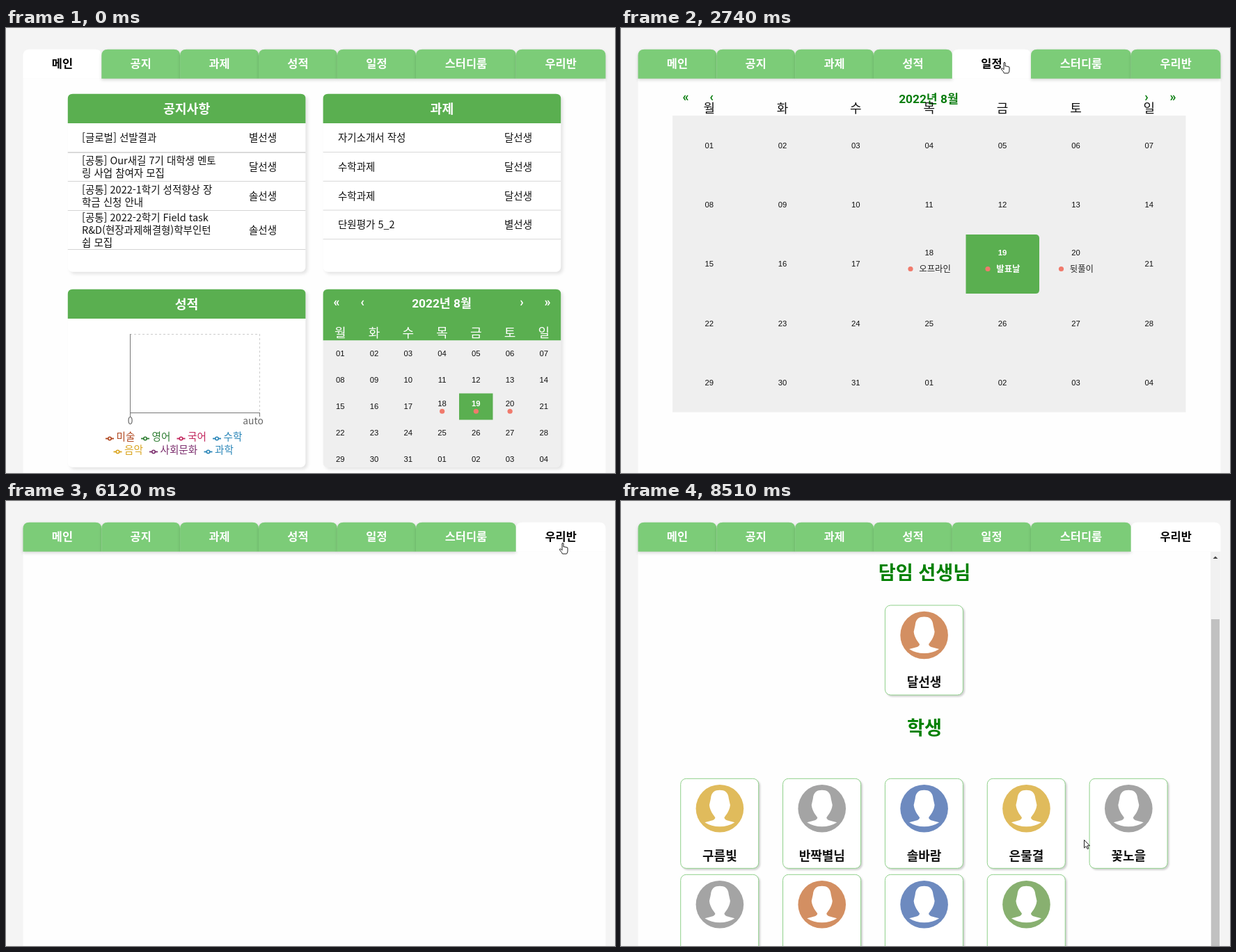
Recreate the animation shown at these times as an HTML page. Size 875 by 640 pixels, loop 8590 ms.

```html
<!DOCTYPE html>
<html lang="ko">
<head>
<meta charset="utf-8">
<style>
html, body { margin: 0; width: 100%; height: 100%; overflow: hidden; background: #f4f4f4; }
svg { display: block; }
text { font-family: "Noto Sans CJK KR", "Noto Sans CJK", "Open Sans", sans-serif; white-space: pre; }
.date { font-family: "Liberation Sans", sans-serif; }
.nav { font-family: Roboto, "Noto Sans CJK KR", "Noto Sans CJK", sans-serif; }
.tab { filter: drop-shadow(0 2px 2px rgba(0,0,0,.16)); }
.card { filter: drop-shadow(3px 3px 2px rgba(0,0,0,.1)); }
.person { filter: drop-shadow(2px 2px 1px rgba(0,0,0,.18)); }
</style>
</head>
<body>
<svg id="stage" width="875" height="640" viewBox="0 0 875 640"></svg>
<script>
const LOOP = 8590, GREEN = '#5aaf50', TAB = '#7ccc78', DEEP = '#008000', CORAL = '#f07a6c';
const LEFT = 88.8, RIGHT = 455.6, CARD_W = 341.6;
const $ = id => document.getElementById(id);

// Text is placed by its vertical centre.
function text(x, y, str, size, { fill = '#111', bold = 0, anchor = 'start', cls = '', id = '' } = {}) {
  return `<text id="${id}" class="${cls}" x="${x}" y="${y + size * .36}" font-size="${size}" fill="${fill}"
    font-weight="${bold ? 700 : 400}" text-anchor="${anchor}">${str.replace('&', '&amp;')}</text>`;
}
const mid = (x, y, str, size, opts) => text(x, y, str, size, { anchor: 'middle', ...opts });
const rect = (x, y, w, h, fill, extra = '') =>
  `<rect x="${x}" y="${y}" width="${w}" height="${h}" fill="${fill}" ${extra}/>`;
const line = (x1, y1, x2, y2, color = '#ddd', extra = '') =>
  `<path d="M${x1} ${y1}L${x2} ${y2}" stroke="${color}" ${extra}/>`;
const dot = (x, y) => `<circle cx="${x}" cy="${y}" r="3.6" fill="${CORAL}"/>`;
const roundTop = (x, y, w, h, r, extra) =>
  `<path d="M${x} ${y + h}v${r - h}q0 ${-r} ${r} ${-r}h${w - 2 * r}q${r} 0 ${r} ${r}v${h - r}z" ${extra}/>`;

// Tabs
const tabNames = ['메인', '공지', '과제', '성적', '일정', '스터디룸', '우리반'];
const tabEdges = [24.5, 137.3, 250.1, 363, 475.9, 589, 732.8, 861.5];
const tabs = tabNames.map((name, i) => {
  const x = tabEdges[i], w = tabEdges[i + 1] - x;
  return `<g id="tab${i}">${roundTop(x, 30.7, w, 42.1, 9, '')}
    ${mid(x + w / 2, 51, name, 16.4, { bold: 1, fill: 'inherit' })}</g>`;
}).join('');

// Main page
function card(x, y, title, body, headHeight = 42.3) {
  return `<g class="card">${rect(x, y, CARD_W, 256, '#fff', 'rx="7"')}
    ${roundTop(x, y, CARD_W, headHeight, 7, `fill="${GREEN}"`)}
    ${title && mid(x + CARD_W / 2, y + 21.5, title, 18.3, { bold: 1, fill: '#fff' })}</g>${body}`;
}

const notices = [
  [158, '별선생', '[글로벌] 선발결과'],
  [200, '달선생', '[공통] Our새길 7기 대학생 멘토', '링 사업 참여자 모집'],
  [242, '솔선생', '[공통] 2022-1학기 성적향상 장', '학금 신청 안내'],
  [291, '솔선생', '[공통] 2022-2학기 Field task', 'R&D(현장과제해결형)학부인턴', '쉽 모집'],
];
const noticeBody = notices.map(([y, teacher, ...lines]) =>
  lines.map((s, i) => text(109, y + (i - (lines.length - 1) / 2) * 18, s, 14.5)).join('') +
  text(349, y, teacher, 14.5)).join('') +
  [179, 220.5, 262.5, 318.5].map((y, i) => line(LEFT, y, LEFT + CARD_W, y, i ? '#d4d4d4' : '#b4b4b4')).join('') +
  `<g id="divider">${line(327.5, 137, 327.5, 318, '#ddd')}</g>`;

const homework = [['자기소개서 작성', '달선생'], ['수학과제', '달선생'], ['수학과제', '달선생'], ['단원평가 5_2', '별선생']];
const homeworkBody = homework.map(([name, teacher], i) => {
  const y = 158 + i * 41.7;
  return text(477, y, name, 14.5) + text(716, y, teacher, 14.5) +
    line(RIGHT, y + 20.6, RIGHT + CARD_W, y + 20.6, '#d8d8d8');
}).join('');

const subjects = [
  ['미술', 143, 588, '#b0461e'], ['영어', 194, 588, '#2e7d32'], ['국어', 245.5, 588, '#c2255c'],
  ['수학', 297, 588, '#2a86b8'], ['음악', 154.5, 607, '#daa520'], ['사회문화', 206, 607, '#7b2d6d'],
  ['과학', 284.5, 607, '#2a86b8'],
];
const chart = line(178, 440.5, 365, 440.5, '#ccc', 'stroke-dasharray="3 3"') +
  line(364.5, 440, 364.5, 553, '#ccc', 'stroke-dasharray="3 3"') +
  `<path d="M178.5 440V559M178 553.5H365M364.5 553V559" fill="none" stroke="#777"/>` +
  mid(178.5, 565, '0', 13.8, { fill: '#666' }) + mid(355, 565, 'auto', 13.8, { fill: '#666' }) +
  subjects.map(([name, x, y, color]) =>
    line(x, y + 2.5, x + 12, y + 2.5, color, 'stroke-width="1.8"') +
    `<circle cx="${x + 6}" cy="${y + 2.5}" r="2.2" fill="#fff" stroke="${color}" stroke-width="1.6"/>` +
    text(x + 15.5, y, name, 14.6, { fill: color })).join('');

// Calendars
const weekdays = [...'월화수목금토일'];
const dayLabel = i => String(i < 31 ? i + 1 : i - 30).padStart(2, '0');
const events = { 17: '오프라인', 18: '발표날', 19: '뒷풀이' };

function calendarNav(xs, y, titleX, color) {
  return [...'«‹›»'].map((c, i) => mid(xs[i], y - 1.5, c, 18, { bold: 1, fill: color, cls: 'nav' })).join('') +
    mid(titleX, y + 1, '2022년 8월', 17.3, { bold: 1, fill: color, cls: 'nav' });
}
function calendarDays(x, y, w, h, eventShift, idPrefix, drawEvent) {
  return Array.from({ length: 35 }, (_, i) => {
    const cx = x + w * (i % 7 + .5), cy = y + h * (Math.floor(i / 7) + .5), today = i === 18;
    return mid(cx, cy - (events[i] ? eventShift : 0), dayLabel(i), 11.3,
      { cls: 'date', bold: today, fill: today ? '#fff' : '#111', id: idPrefix + i }) +
      (events[i] ? drawEvent(cx, cy, i) : '');
  }).join('');
}

const smallCalendar = card(RIGHT, 375.8, '', `
  <path d="M${RIGHT} 449.500h${CARD_W}v175.500q0 7-7 7H462.600q-7 0-7-7z" fill="#efefef"/>
  ${rect(651, 525.5, 48.5, 38, GREEN)}
  ${calendarNav([475, 512, 741, 778], 395, 626, '#fff')}
  ${weekdays.map((d, i) => mid(480.4 + i * 48.75, 439, d, 18, { fill: '#fff' })).join('')}
  ${calendarDays(456, 449.2, 48.75, 37.9, 4, 's', (x, y) => dot(x, y + 7.3))}`, 73.7);

const eventX = { 17: 416, 18: 527, 19: 632.5 };
const bigCalendar = rect(74, 126, 737.5, 426.5, '#efefef') +
  `<path d="M495.5 297h100q5.5 0 5.5 5.5v74q0 5.5-5.5 5.5h-100z" fill="${GREEN}"/>` +
  calendarNav([93, 130, 755, 793], 100.5, 442, '#0a7d0f') +
  weekdays.map((d, i) => mid(126.7 + i * 105.35, 116, d, 18)).join('') +
  calendarDays(74, 126, 105.35, 85.3, 16.3, 'd', (x, y, i) => dot(eventX[i], 346.5) +
    text(eventX[i] + 12.3, 346.5, events[i], 12.4, { bold: i === 18, fill: i === 18 ? '#fff' : '#222', id: 'e' + i }));

// Class page
const ORANGE = '#d38f62', YELLOW = '#e0bb5c', GRAY = '#a4a4a4', BLUE = '#6d8abf', LEAF = '#88b070';
function person(col, y, color, name) {
  const x = 85.7 + col * 146.85;
  return `<g class="person">${rect(x, y, 112, 129, '#fff', 'rx="8" stroke="#8fd08a"')}</g>
    <g transform="translate(${x + 56.2} ${y + 43})"><circle r="34.3" fill="${color}"/>
      <path fill="#fff" d="M-13-14C-12-24-7-26.500 0-26.500S12-24 13-14L15-5C14 4 9 9 6.500 13C7 17 11 17 21.500 20
        Q12 26 0 26T-21.500 20C-11 17-7 17-6.500 13C-9 9-14 4-15-5z"/></g>
    ${mid(x + 56.2, y + 111, name, 18, { bold: 1 })}`;
}
const firstRow = [[YELLOW, '구름빛'], [GRAY, '반짝별님'], [BLUE, '솔바람'], [YELLOW, '은물결'], [GRAY, '꽃노을']];
const classroom = `<g clip-path="url(#panel)"><g id="scroll">
  ${mid(436, 116, '3학년 5반', 36.5, { bold: 1, fill: DEEP })}
  ${rect(147.5, 158, 576, 3.6, DEEP)}
  ${mid(436, 205, '담임 선생님', 27.2, { bold: 1, fill: DEEP })}
  ${person(2, 252, ORANGE, '달선생')}
  ${mid(436, 428, '학생', 27.2, { bold: 1, fill: DEEP })}
  ${firstRow.map(([color, name], i) => person(i, 501.3, color, name)).join('')}
  ${[GRAY, ORANGE, BLUE, LEAF].map((color, i) => person(i, 639.3, color, '')).join('')}
  </g>${rect(847, 73, 14.5, 567, '#f1f1f1')}
  ${rect(848, 87, 12, 485, '#c1c1c1', 'id="thumb"')}
  <path id="up" d="M850.500 83h7l-3.500-3.500z"/></g>`;

$('stage').innerHTML = `
  <clipPath id="panel">${rect(24.5, 73, 837, 567, '#fff')}</clipPath>
  ${rect(24.5, 73, 837, 567, '#fefefe')}
  <g id="main">
    ${card(RIGHT, 94.8, '과제', homeworkBody)}
    ${card(LEFT, 375.8, '성적', chart)}
    ${smallCalendar}
    <g id="notice">${card(LEFT, 94.8, '공지사항', noticeBody)}</g>
  </g>
  <g id="schedule">${bigCalendar}</g>
  <g id="classroom">${classroom}</g>
  ${tabs}
  <g id="cursor" fill="#fff" stroke="#222" stroke-linejoin="round">
    <path id="arrow" d="M.5.5v11.500l2.700-2.500 2 4 1.700-.8-1.900-3.900h3.500z"/>
    <path id="hand" d="M-1 1q1-1.500 2 0v5q1-1 2 .3 1-.8 2 .4 2-.5 2 1.300v4q0 2-1.500 4h-6q-1-2.500-3.500-5-1.500-2 0-2.200 1.500 0 3 2z"/>
  </g>`;

// Piecewise linear track: rows of [ms, value, value…]
function track(rows, t) {
  if (t <= rows[0][0]) return rows[0].slice(1);
  const i = rows.findIndex(r => r[0] > t);
  if (i < 0) return rows.at(-1).slice(1);
  const a = rows[i - 1], b = rows[i], k = (t - a[0]) / (b[0] - a[0]);
  return a.slice(1).map((v, j) => v + (b[j + 1] - v) * k);
}
const cursorPath = [
  [520, 66, 330], [720, 250, 235], [930, 431, 120], [1060, 503, 75], [1340, 547, 49], [1410, 551, 49],
  [2800, 551, 49], [3050, 545, 160], [3250, 540, 325], [3420, 470, 350], [3570, 590, 390],
  [3800, 640, 340], [4000, 560, 258], [4200, 480, 425], [4470, 700, 435], [4700, 785, 450],
  [4900, 862, 362], [5100, 861, 225], [5370, 802, 92], [5500, 797, 72], [5720, 800, 60],
  [7110, 800, 60], [7300, 845, 110], [7450, 864, 200], [7650, 856, 360], [7880, 830, 460],
  [8020, 745, 485], [8230, 665, 489], [8510, 665, 487],
];
const noticeScale = [[560, 1], [760, 1.05], [930, 1.05], [1100, 1]];
const scrollTrack = [[8260, 0], [8380, 62], [8500, 102]];

// Dates keep a tint once the pointer has passed: [ms, element, colour]
const tints = [
  [3420, 'd17', '#3a2a2e'], [3420, 'e17', '#3a2a2e'], [3570, 'd24', '#2f4a48'], [3640, 'd25', '#1f4644'],
  [3800, 'd19', '#8a6a50'], [3800, 'e19', '#8a6a50'], [3900, 'd12', '#777'], [4000, 'd11', '#2f7d32'],
  [4400, 'd26', '#3c4858'], [4540, 'd27', '#3c4858'],
];
const switches = [[0, 0], [2010, 4], [5990, 6]];

const show = (id, on) => $(id).style.display = on ? '' : 'none';

function render(t) {
  const step = switches.findLastIndex(s => t >= s[0]);
  const [since, active] = switches[step];
  const previous = step ? switches[step - 1][1] : -1;
  const fade = step ? Math.min(1, (t - since + 50) / 180) : 1;
  tabNames.forEach((_, i) => {
    const lit = i === active ? fade : i === previous ? 1 - fade : 0, [shape, label] = $('tab' + i).children;
    shape.style.fill = `color-mix(in srgb, #fff ${lit * 100}%, ${TAB})`;
    label.style.fill = `color-mix(in srgb, #000 ${lit * 100}%, #fff)`;
    $('tab' + i).setAttribute('class', i === active ? '' : 'tab');
  });

  show('main', active === 0);
  show('schedule', active === 4);
  show('classroom', t >= 6270);

  const [scale] = track(noticeScale, t);
  $('notice').setAttribute('transform', `translate(260 223) scale(${scale}) translate(-260 -223)`);
  show('divider', scale > 1);
  for (const [ms, id, color] of tints) $(id).style.fill = t >= ms ? color : '';

  const [x, y] = track(cursorPath, t), [scroll] = track(scrollTrack, t);
  $('scroll').setAttribute('transform', `translate(0 ${-scroll})`);
  $('thumb').setAttribute('y', 87 + scroll * .814);
  $('thumb').setAttribute('fill', x > 847 && x < 861 && y > 87 ? '#a8a8a8' : '#c1c1c1');
  $('up').setAttribute('fill', scroll ? '#444' : '#8bc784');

  const pointing = t >= 1410 && y < 73;
  show('cursor', t >= 520);
  show('arrow', !pointing);
  show('hand', pointing);
  $('cursor').setAttribute('transform', `translate(${x} ${y})`);
}

function frame(now) {
  render(now % LOOP);
  requestAnimationFrame(frame);
}
frame(performance.now());
</script>
</body>
</html>
```
